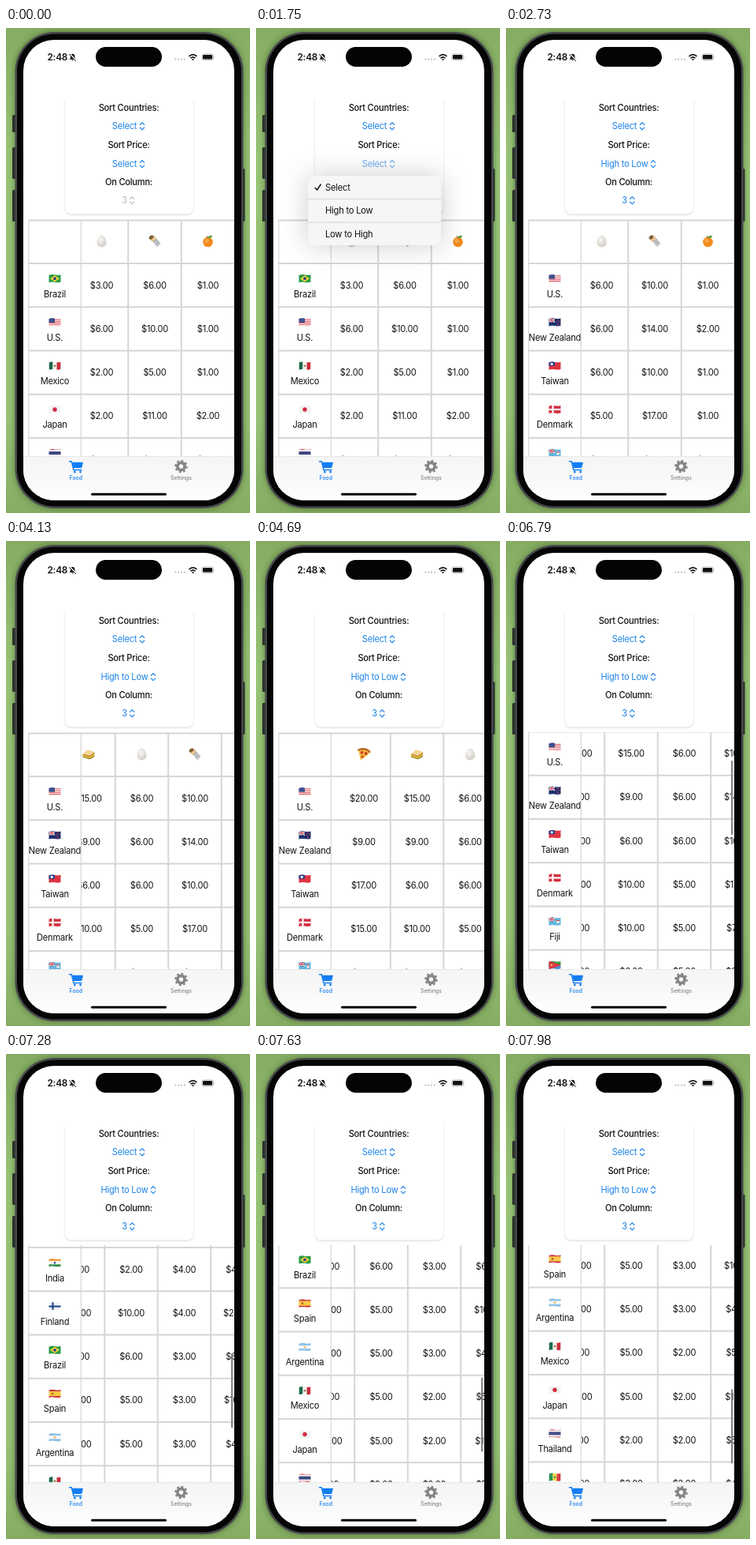
An HTML page that plays this animation: 310 by 614 pixels, repeating every 8000 ms.

```html
<!DOCTYPE html>
<html lang="en">
<head>
<meta charset="utf-8">
<title>Food prices</title>
<style>
  html, body { margin: 0; width: 100%; height: 100%; overflow: hidden; background: #93be6f; }
  svg { display: block; position: absolute; left: 0; top: 0; }
  text { font-family: Inter, Roboto, sans-serif; font-size: 11.1px; letter-spacing: -.23px; text-anchor: middle; fill: #111; }
  .label { font-weight: 500; }
  .link { fill: #1c82e6; }
  .chev { fill: none; stroke: #1c82e6; stroke-width: 1.1; stroke-linecap: round; stroke-linejoin: round; }
  .off .link { fill: #bdbdbf; }
  .off .chev { stroke: #bdbdbf; }
  .line { fill: none; stroke: #d6d6d6; stroke-width: 2; }
  .item { text-anchor: start; font-size: 11.2px; }
  .tab { font-size: 6.9px; font-weight: 500; letter-spacing: 0; }
  .card { filter: drop-shadow(0 1px 1.3px rgba(0,0,0,.16)); }
  .panel { filter: drop-shadow(0 0 17px rgba(0,0,0,.2)); }
  .phone { filter: drop-shadow(0 0 4px rgba(40,70,20,.55)); }
</style>
</head>
<body>
<svg width="310" height="614" viewBox="0 0 310 614">
  <defs>
    <linearGradient id="green" x2="0" y2="1">
      <stop offset="0" stop-color="#86ac63"/><stop offset=".25" stop-color="#98c476"/>
      <stop offset=".8" stop-color="#98c476"/><stop offset="1" stop-color="#86ac63"/>
    </linearGradient>
    <radialGradient id="shell" cx=".4" cy=".35" r=".7">
      <stop offset="0" stop-color="#fbf8f4"/><stop offset="1" stop-color="#cfc9c2"/>
    </radialGradient>
    <linearGradient id="bar" x2="0" y2="1">
      <stop offset="0" stop-color="#f5f5f5"/><stop offset=".5" stop-color="#f9f9f9"/><stop offset="1" stop-color="#fff"/>
    </linearGradient>
    <clipPath id="screen"><rect x="22" y="15" width="268" height="583" rx="39"/></clipPath>
    <clipPath id="view"><rect x="28" y="242" width="262" height="301"/></clipPath>
    <clipPath id="form"><rect x="60" y="91" width="200" height="152"/></clipPath>
    <clipPath id="flag"><path d="M-7.5-4.2Q-3.8-5.8 0-4.8T7.5-5V4.4Q3.8 5.6 0 4.6T-7.5 5Z"/></clipPath>
  </defs>

  <rect width="310" height="614" fill="url(#green)"/>
  <g fill="#2c2e30">
    <rect x="8" y="110" width="5" height="22" rx="1.5"/>
    <rect x="8" y="151" width="5" height="40" rx="1.5"/>
    <rect x="8" y="205" width="5" height="40" rx="1.5"/>
    <rect x="299" y="178" width="4.5" height="67" rx="1.5"/>
  </g>
  <rect class="phone" x="11.5" y="5" width="290" height="603" rx="50" fill="#47494c"/>
  <rect x="14" y="7.5" width="285" height="598" rx="47.5" fill="#050505"/>
  <rect x="22" y="15" width="268" height="583" rx="39" fill="#fff"/>

  <g clip-path="url(#screen)">
    <g clip-path="url(#form)">
      <rect class="card" x="75" y="60" width="163" height="175.5" rx="8" fill="#fff"/>
    </g>
    <text class="label" x="156" y="104.7">Sort Countries:</text>
    <text class="label" x="156" y="152.2">Sort Price:</text>
    <text class="label" x="156" y="199">On Column:</text>
    <text class="link" x="150.5" y="128">Select</text>
    <path class="chev" d="M170.3 122.5l2.7-2.8 2.7 2.8M170.3 126l2.7 2.8 2.7-2.8"/>
    <g id="price">
      <text class="link" x="150.5" y="176">Select</text>
      <path class="chev" d="M170.3 170.3l2.7-2.8 2.7 2.8M170.3 173.8l2.7 2.8 2.7-2.8"/>
    </g>
    <g id="column">
      <text class="link" x="150.5" y="222">3</text>
      <path class="chev" d="M157.6 216.5l2.7-2.8 2.7 2.8M157.6 220l2.7 2.8 2.7-2.8"/>
    </g>

    <g clip-path="url(#view)"><g id="scroll"></g></g>
    <rect id="thumb" x="286" width="2.2" height="94" rx="1.1" fill="#858585"/>

    <g id="menu">
      <rect class="panel" x="66" y="187" width="169" height="88" rx="9" fill="#f6f6f7"/>
      <path d="M66 216.5h169M66 246h169" stroke="#d5d5d7"/>
      <path d="M75.2 202.2l2.4 2.8 4.6-7" fill="none" stroke="#111" stroke-width="1.4" stroke-linecap="round" stroke-linejoin="round"/>
      <text class="item" x="88" y="205.7">Select</text>
      <text class="item" x="88" y="235.2">High to Low</text>
      <text class="item" x="88" y="264.7">Low to High</text>
    </g>

    <rect x="22" y="542" width="268" height="60" fill="url(#bar)"/>
    <path d="M22 542.5h268" stroke="#e3e3e3" stroke-width=".7"/>
    <g fill="#137df3">
      <path d="M80.5 548.8h2.8l2.6 10.6h10" fill="none" stroke="#137df3" stroke-width="1.5" stroke-linecap="round"/>
      <path d="M84 549.7h13.2q.9 0 .7.9l-1.4 5.5q-.2.8-1 .8H85.8z"/>
      <circle cx="87.3" cy="562" r="1.4"/><circle cx="94.6" cy="562" r="1.4"/>
    </g>
    <text class="tab" x="88.8" y="572.2" style="fill:#137df3">Food</text>
    <g fill="none" stroke="#858585">
      <circle cx="222.5" cy="555" r="7.2" stroke-width="2.2" pathLength="16" stroke-dasharray="1 1"/>
      <circle cx="222.5" cy="555" r="4.6" stroke-width="3.8"/>
    </g>
    <text class="tab" x="222.5" y="572.2" style="fill:#858585">Settings</text>
    <rect x="108" y="588.8" width="96" height="3" rx="1.5" fill="#080808"/>

    <text x="65.3" y="41.2" style="font-size:11.8px;font-weight:600">2:48</text>
    <path d="M80.5 39.7q1.6-1.4 1.5-3.5 0-3.3 2.7-3.5 2.7.2 2.7 3.5-.1 2.1 1.5 3.5zM83.3 40.6h2.8q-1.4 1.8-2.8 0z" fill="#111"/>
    <path d="M80.6 32.8l8.6 8.6" stroke="#fff" stroke-width="2"/>
    <path d="M80.2 33.2l8.6 8.6" stroke="#111" stroke-width="1"/>
    <g fill="#bcbcbc">
      <circle cx="215.4" cy="39.6" r="1.1"/><circle cx="219.2" cy="39.6" r="1.1"/>
      <circle cx="223" cy="39.6" r="1.1"/><circle cx="226.8" cy="39.6" r="1.1"/>
    </g>
    <g fill="none" stroke="#111" stroke-width="1.6">
      <path d="M232.5 35.9q5-4.6 10 0M234.5 38.2q3-2.6 6 0"/>
      <path d="M237.5 41l-1.2-1.3q1.2-.9 2.4 0z" fill="#111" stroke-width=".6"/>
    </g>
    <rect x="248.9" y="32.9" width="14.6" height="7.8" rx="2.4" fill="#fff" stroke="#a5a5a5" stroke-width=".8"/>
    <rect x="250" y="34" width="12.2" height="5.6" rx="1.4" fill="#111"/>
    <path d="M264.8 35.6q1.3 1.2 0 2.5z" fill="#a5a5a5"/>
  </g>
  <rect x="114" y="24" width="84" height="25" rx="12.5" fill="#040404"/>
</svg>

<script>
const LOOP = 8000, STEP = 70;
const ROW = 55.25, COL = 67.5, TOP = 325.5, EGG_X = 121.5;
const byId = id => document.getElementById(id);

// Flag parts, drawn in a 15 by 10 box around the origin
const box = (x, y, w, h, c) => `<rect x="${x}" y="${y}" width="${w}" height="${h}" fill="${c}"/>`;
const dot = (x, y, r, c) => `<circle cx="${x}" cy="${y}" r="${r}" fill="${c}"/>`;
const rows = (...cs) => cs.map((c, i) => box(-8, -6 + i * 12 / cs.length, 16, 12 / cs.length + .1, c)).join('');
const cols = (...cs) => cs.map((c, i) => box(-7.5 + i * 15 / cs.length, -6, 15 / cs.length + .1, 12, c)).join('');
const cross = (bg, c) => rows(bg) + box(-3.6, -6, 2.2, 12, c) + box(-8, -1.1, 16, 2.2, c);
const jack = bg => rows(bg) + box(-8, -6, 8, 6, '#23397c') +
  '<path d="M-8-5L0 0M0-5L-8 0" stroke="#fff" stroke-width="1.1"/><path d="M-4-6V0M-8-2.6H0" stroke="#fff" stroke-width="1.8"/><path d="M-4-6V0M-8-2.6H0" stroke="#cf2a36"/>';

const flags = {
  Brazil: rows('#279b45') + '<path d="M-6 0L0-4 6 0 0 4z" fill="#f8d335"/>' + dot(0, 0, 1.9, '#25418c'),
  'U.S.': rows(...Array.from({ length: 11 }, (_, i) => i % 2 ? '#fff' : '#d5434d')) + box(-8, -6, 8, 6.5, '#3b518f'),
  Mexico: cols('#1c6b4a', '#f4f4f2', '#c72f3c') + dot(0, 0, 1.3, '#96754a'),
  Japan: rows('#f3f3f3') + dot(0, 0, 2.7, '#d22b40'),
  Thailand: rows('#d5303f', '#f4f4f4', '#2f3a78', '#2f3a78', '#f4f4f4', '#d5303f'),
  'New Zealand': jack('#1d2f6d') + dot(4, -2.8, .8, '#d8404c') + dot(2.4, 0, .8, '#d8404c') + dot(5.8, -.4, .7, '#d8404c') + dot(4, 2.8, .9, '#d8404c'),
  Taiwan: rows('#df3442') + box(-8, -6, 8, 6, '#26408f') + dot(-3.8, -2.4, 1.6, '#fff'),
  Denmark: cross('#d22f40', '#fff'),
  Fiji: jack('#62b5df') + box(2.4, -1.8, 3.4, 4, '#f5f0ec') + box(2.4, -1.8, 3.4, 1.2, '#d0404a'),
  Eritrea: rows('#3c9c48', '#4c8fd8') + '<path d="M-8-6L8 0-8 6z" fill="#d93a45"/>' + dot(-4, 0, 1.3, '#f0c34a'),
  France: cols('#2b4392', '#f4f4f4', '#d63a45'),
  India: rows('#f19a3e', '#f6f6f4', '#2c8d44') + dot(0, 0, 1.4, '#4a5a9c'),
  Finland: cross('#f2f4f6', '#264a8c'),
  Spain: rows('#c9303a', '#f6c63c', '#f6c63c', '#c9303a') + dot(-3, 0, 1.4, '#b0633a'),
  Argentina: rows('#8cc0e6', '#f6f6f6', '#8cc0e6') + dot(0, 0, 1.2, '#e6b34a'),
  Senegal: cols('#2f9350', '#f6d646', '#d53a42') + dot(0, 0, 1.2, '#2f9350')
};

const foods = [
  // pizza
  '<path d="M-7-5.5Q2-9 7.5-3L6 0 -4 7.5z" fill="#f3b93f"/><path d="M-7-5.5Q2-9 7.5-3" fill="none" stroke="#b8692c" stroke-width="2.4" stroke-linecap="round"/>' +
    dot(-2.5, -2.2, 1.9, '#c93b25') + dot(2.6, -1, 1.9, '#c93b25') + dot(-1.8, 3, 1.6, '#c93b25'),
  // sandwich
  '<path d="M-7.5 0L-1-5.5 7.5-2.5 7 3.5 1.5 6.5-7.5 3.5z" fill="#b9783a"/><path d="M-7.5-.5L-1-5.5 7.5-2.5 1.5 2z" fill="#f6d695"/><path d="M-7.3 1.6L1.6 4.3 7.3.2" fill="none" stroke="#f4c331" stroke-width="1.6"/><path d="M-7.3 3L1.6 5.6 7.2 1.8" fill="none" stroke="#6e9a3a" stroke-width=".8"/>',
  // egg
  '<path d="M0-7.5C3.4-7.5 6-2 6 1.6A6 6 0 0 1-6 1.6C-6-2-3.4-7.5 0-7.5z" fill="url(#shell)"/>',
  // wrap
  '<path d="M-6.5-5L-1-7.5 7.5 3 3 7.5z" fill="#c3c6c9"/><path d="M-7.3-3.5Q-7-7.8-1.5-7.5L2.2-3-3.2 1z" fill="#e6c392"/><ellipse cx="-4.6" cy="-5" rx="3" ry="2" transform="rotate(-35 -4.6 -5)" fill="#6a4a2b"/>' +
    dot(-5.3, -4.6, .9, '#6ea53d') + dot(-3.7, -5.6, .8, '#cf4630') + '<path d="M-2 1L3-2.5M1 3.5L5.5.5" stroke="#8f9498" stroke-width=".8"/>',
  // orange
  dot(0, 1, 6.3, '#f28a1c') + dot(-1.6, -.6, 2.6, '#f9a744') + '<path d="M0-4.5Q1-8.5 6-6.5 4-3 0-4.5z" fill="#4d9a35"/><path d="M0-4L-1.5-7" stroke="#6b5a2a"/>'
];

// Prices by food, in the order above
const prices = {
  'U.S.': [20, 15, 6, 10, 1], 'New Zealand': [9, 9, 6, 14, 2], Taiwan: [17, 6, 6, 10, 1],
  Denmark: [15, 10, 5, 17, 1], Fiji: [9, 10, 5, 7, 1], Eritrea: [8, 6, 5, 8, 1],
  France: [12, 7, 4, 9, 1], India: [5, 2, 4, 4, 1], Finland: [15, 10, 4, 20, 1],
  Brazil: [9, 6, 3, 6, 1], Spain: [10, 5, 3, 10, 1], Argentina: [10, 5, 3, 4, 1],
  Mexico: [8, 5, 2, 5, 1], Japan: [20, 5, 2, 11, 2], Thailand: [7, 2, 2, 5, 1], Senegal: [6, 3, 2, 4, 1]
};
const sorted = Object.keys(prices);
const unsorted = ['Brazil', 'U.S.', 'Mexico', 'Japan', 'Thailand', 'India'];

const cellX = i => EGG_X + (i - 2) * COL;
const at = (x, y, body) => `<g transform="translate(${x} ${y})">${body}</g>`;

function table(names) {
  const bottom = TOP + (names.length - .5) * ROW, top = TOP - 1.5 * ROW + .8;
  let cells = foods.map((f, i) => at(cellX(i), 270, f)).join('');
  let heads = '', rules = `M28 ${top}H290`;
  names.forEach((name, r) => {
    const y = TOP + r * ROW;
    cells += prices[name].map((p, i) => `<text x="${cellX(i)}" y="${y + 4}">$${p}.00</text>`).join('');
    heads += at(62, y - 8.3, `<g clip-path="url(#flag)">${flags[name]}</g>`) +
      `<text x="62" y="${y + 15}">${name}</text>`;
    rules += `M28 ${y - ROW / 2}H290`;
  });
  const posts = foods.map((_, i) => `M${cellX(i) + COL / 2} ${top}V${bottom}`).join('');
  return `<g><g class="slide">${cells}<path class="line" d="${posts}"/></g>
    <rect x="22" y="${top}" width="73" height="${bottom - top}" fill="#fff"/>
    <path class="line" d="${rules}"/>
    <path class="line" style="stroke-width:1.2" d="M28.8 ${top}V${bottom}M95.3 ${top}V${bottom}"/>${heads}</g>`;
}

const scroll = byId('scroll');
scroll.innerHTML = table(unsorted) + table(sorted);
const [before, after] = scroll.children;
const slides = document.querySelectorAll('.slide');
const [priceText] = byId('price').children, priceChev = byId('price').children[1];

const menuTrack = [[1330, 0], [1400, .08], [1470, .45], [1540, .8], [1610, .96], [1680, 1],
  [2380, 1], [2450, .93], [2520, .6], [2590, .25], [2660, .06], [2730, 0]];
const slideTrack = [[3990, 0], [4060, 20], [4130, 51], [4200, 84], [4270, 112], [4340, 132], [4410, 146],
  [4550, 154], [4830, 147], [5250, 143], [5320, 143], [5390, 138], [5530, 118], [5670, 110], [5950, 105]];

function track(keys, t) {
  const i = keys.findIndex(k => k[0] > t);
  if (i < 0) return keys[keys.length - 1][1];
  if (!i) return keys[0][1];
  const [t0, a] = keys[i - 1], [t1, b] = keys[i];
  return a + (b - a) * (t - t0) / (t1 - t0);
}

// A flick that slows down exponentially
const flick = t => t < 6790 ? 0 : 56.5 + 608 * (1 - Math.exp(-2.03 * (t - 6790) / 1000));

function draw(t) {
  const open = track(menuTrack, t), dx = track(slideTrack, t), dy = flick(t), chosen = t >= 2520;
  const size = .25 + .75 * open;
  byId('menu').setAttribute('opacity', Math.min(1, open * 1.25));
  byId('menu').setAttribute('transform', `translate(156 176) scale(${size}) translate(-156 -176)`);
  byId('menu').style.display = open ? '' : 'none';

  byId('price').setAttribute('opacity', 1 - .35 * open);
  priceText.textContent = chosen ? 'High to Low' : 'Select';
  priceChev.setAttribute('transform', `translate(${chosen ? 14 : 0} 0)`);
  byId('column').setAttribute('class', chosen ? '' : 'off');

  before.style.display = chosen ? 'none' : '';
  after.style.display = chosen ? '' : 'none';
  scroll.setAttribute('transform', `translate(0 ${-dy})`);
  slides.forEach(s => s.setAttribute('transform', `translate(${dx} 0)`));
  byId('thumb').setAttribute('y', 278 + (dy - 56.5) / 3.78);
  byId('thumb').style.display = dy ? '' : 'none';
}

const start = performance.now();
function tick() {
  const t = (performance.now() - start) % LOOP;
  draw(Math.floor(t / STEP) * STEP);
  requestAnimationFrame(tick);
}
tick();
</script>
</body>
</html>
```
